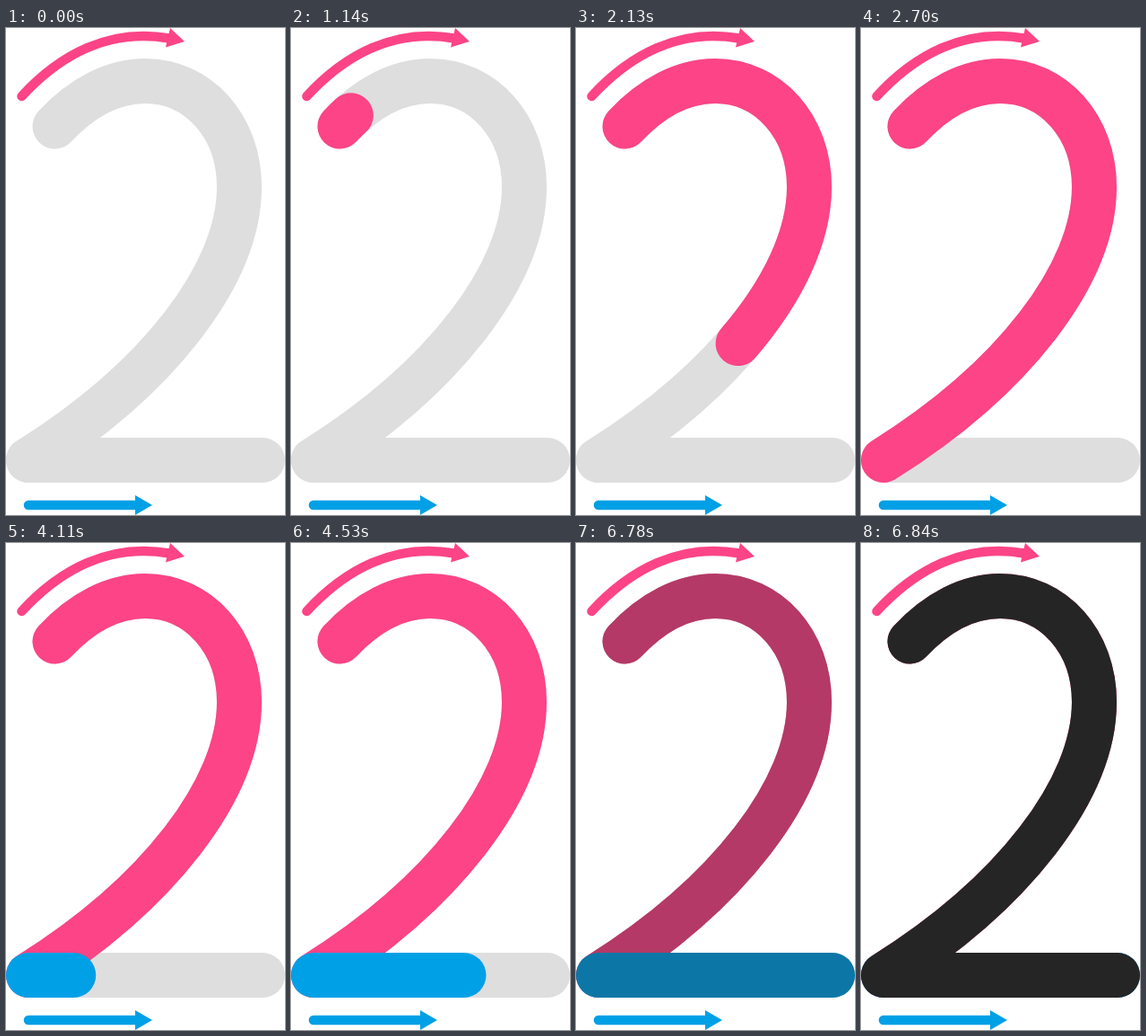
Write an HTML page with a canvas that moves like this. It is 311 by 542 pixels and loops after 8550 ms.

```html
<!DOCTYPE html>
<html lang="en">
<head>
<meta charset="utf-8">
<title>Writing the digit 2</title>
<style>
html, body { margin: 0; width: 100%; height: 100%; overflow: hidden; background: #fff; }
canvas { display: block; width: 311px; height: 542px; }
</style>
</head>
<body>
<canvas id="stage"></canvas>
<script>
const W = 311, H = 542, LOOP = 8550, STEP = 30;
const PINK = '#fc4486', BLUE = '#00a0e6', GRAY = '#dedede', DARK = '#252525';

const canvas = document.getElementById('stage');
const ctx = canvas.getContext('2d');
const dpr = window.devicePixelRatio || 1;
canvas.width = Math.round(W * dpr);
canvas.height = Math.round(H * dpr);
ctx.scale(dpr, dpr);
ctx.lineCap = 'round';
ctx.lineJoin = 'round';

function makePath(d) {
  const el = document.createElementNS('http://www.w3.org/2000/svg', 'path');
  el.setAttribute('d', d);
  return { shape: new Path2D(d), length: el.getTotalLength() };
}

const hook = makePath('M54.5 109.5 C85 77 120 59 155 59 C215 59 260 110 260 177 C260 274 169 391 25 481');
const base = makePath('M25 481 H286');
const curveShaft = makePath('M17.5 76 C60 30 115 0 182 11.5');
const curveHead = new Path2D('M183 0 L199 15 L178 21.5 Z');
const flatShaft = makePath('M25 531 H146');
const flatHead = new Path2D('M144 520 L163 531 L144 542 Z');

// Cubic Bezier easing (.5, 0, .67, 1), solved by bisection
function ease(x) {
  if (x <= 0) return 0;
  if (x >= 1) return 1;
  let lo = 0, hi = 1, s = x;
  for (let i = 0; i < 30; i++) {
    s = (lo + hi) / 2;
    const r = 1 - s;
    if (1.5 * s * r * r + 2.01 * s * s * r + s * s * s < x) lo = s; else hi = s;
  }
  return s * s * (3 - 2 * s);
}

function stroke(path, color, width, part = 1) {
  if (part <= 0) return;
  ctx.setLineDash(part < 1 ? [path.length * part, path.length * 2] : []);
  ctx.strokeStyle = color;
  ctx.lineWidth = width;
  ctx.stroke(path.shape);
}

function arrow(shaft, head, color) {
  stroke(shaft, color, 10.5);
  ctx.fillStyle = color;
  ctx.fill(head);
}

function draw(t) {
  ctx.fillStyle = '#fff';
  ctx.fillRect(0, 0, W, H);
  arrow(curveShaft, curveHead, PINK);
  arrow(flatShaft, flatHead, BLUE);

  stroke(hook, GRAY, 50);
  stroke(base, GRAY, 50);
  stroke(hook, PINK, 50, ease((t - 900) / 1800));
  stroke(base, BLUE, 50, ease((t - 3600) / 1440));

  const fade = Math.min(1, (t - 6750) / 90);
  if (fade > 0) {
    // One combined path keeps the overlap evenly tinted
    const digit = new Path2D(hook.shape);
    digit.addPath(base.shape);
    ctx.globalAlpha = fade;
    stroke({ shape: digit }, DARK, 50);
    ctx.globalAlpha = 1;
  }
}

const start = performance.now();
function tick() {
  const t = (performance.now() - start) % LOOP;
  draw(Math.floor(t / STEP) * STEP);
  requestAnimationFrame(tick);
}
tick();
</script>
</body>
</html>
```
